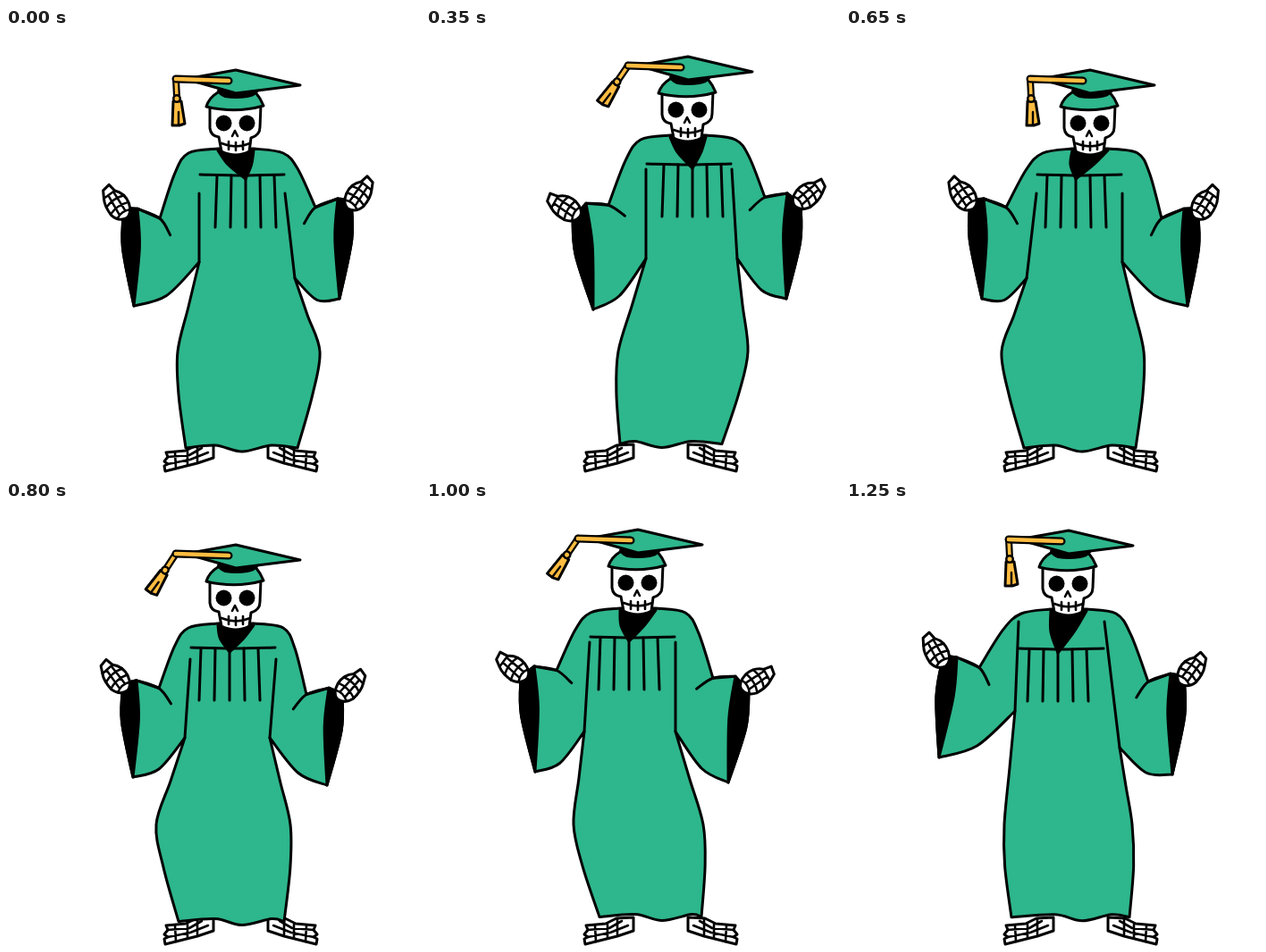
Animation, 463 px wide and 498 px high, one loop 1300 ms. Source, as an HTML page with a canvas:

```html
<!DOCTYPE html>
<html lang="en">
<head>
<meta charset="utf-8">
<title>Dancing graduate</title>
<style>
html, body { margin: 0; width: 100%; height: 100%; overflow: hidden; background: #fff; }
canvas { display: block; }
</style>
</head>
<body>
<canvas id="stage" width="463" height="498"></canvas>
<script>
const ctx = document.getElementById('stage').getContext('2d');
const GREEN = '#2eb68c', GOLD = '#ffbc40', INK = '#000', BONE = '#fff';
const LOOP = 1300, HALF = 650, STEP = 50, AXIS = 525;

// head: x, y, tassel angle. chest: x, y, drop of the sleeve seams.
// left and right: hand x y, sleeve tip x y, underarm x y, hip x, hand angle, hem x.
// The right side is stored mirrored, so both sides share one rig.
const poses = [
  { t: 0, head: [257, 64, 0], chest: [264, 164, 21],
    left: [124, 197, 143, 311, 216, 262, 192, 32, 201],
    right: [131, 187, 152, 303, 202, 280, 174, 35, 199] },
  { t: 150, head: [273, 66, 36], chest: [271, 164, 13],
    left: [141, 208, 166, 318, 230, 265, 207, 42, 214],
    right: [123, 198, 142, 309, 200, 265, 168, 38, 193] },
  { t: 350, head: [293, 49, 37], chest: [294, 152, 6],
    left: [156, 201, 187, 315, 246, 258, 215, 57, 217],
    right: [98, 187, 122, 303, 177, 258, 165, 50, 194] },
  { t: 550, head: [303, 39, 0], chest: [307, 149, 2],
    left: [161, 191, 183, 286, 239, 254, 215, 60, 206],
    right: [83, 174, 91, 271, 173, 222, 180, 48, 186] },
  { t: 600, head: [281, 50, 0], chest: [284, 165, -30],
    left: [139, 190, 160, 306, 219, 276, 205, 37, 208],
    right: [101, 169, 104, 287, 189, 235, 177, 30, 185] }
];

// The second half of the dance is the first one mirrored.
const flip = ({ t, head: [x, ...head], chest: [cx, ...chest], left, right }) => ({
  t: t + HALF, head: [530 - x, ...head], chest: [AXIS - cx, ...chest], left: right, right: left
});
const keys = [...poses, ...poses.map(flip)];
const keyAt = i => keys[(i + keys.length) % keys.length];
const gap = i => (keyAt(i + 1).t - keyAt(i).t + LOOP) % LOOP;

// Even entries use central slopes, odd entries follow a parabola through three keys.
function slope(part, i, k) {
  const [a, b, c] = [-1, 0, 1].map(d => keyAt(i + d)[part][k]);
  const h = gap(i - 1), g = gap(i);
  return k % 2 ? ((b - a) / h * g + (c - b) / g * h) / (h + g) : (c - a) / (h + g);
}
function poseAt(t) {
  const i = keys.filter(key => key.t <= t).length - 1;
  const h = gap(i), u = (t - keys[i].t) / h, v = 1 - u, s = u * u * (3 - 2 * u);
  const mix = part => keys[i][part].map((a, k) =>
    a + (keyAt(i + 1)[part][k] - a) * s +
    h * u * v * (v * slope(part, i, k) - u * slope(part, i + 1, k)));
  return { head: mix('head'), chest: mix('chest'), left: mix('left'), right: mix('right') };
}

const between = (p, q, u, dx = 0, dy = 0) =>
  [p[0] + (q[0] - p[0]) * u + dx, p[1] + (q[1] - p[1]) * u + dy];
const mirror = ([x, y]) => [AXIS - x, y];

// Builds one side of the gown around the hand, the head and the chest.
function side([hx, hy, tx, ty, ax, ay, hip, angle, hem], [headX, headY], [chestX, chestY, drop]) {
  const rad = angle * Math.PI / 180, tip = [tx, ty], arm = [ax, ay];
  const neck = [headX - 20, headY + 71], shoulder = [headX - 53, headY + 76];
  const elbow = [hx + 48, hy + 40 - 0.75 * angle];
  const crease = [elbow[0] + 22 * Math.sin(rad), elbow[1] + 22 * Math.cos(rad)];
  const cuff = [hx + 23, hy + 18 - 0.4 * angle];
  const rim = [cuff[0] - 15, cuff[1] + 0.7 * (angle - 33)];
  const hips = [hip, 362], foot = [hem, hemLine(headY) + 2];
  const opening = [rim, between(rim, tip, 0.4, -6), tip];
  return {
    outline: [
      [neck, shoulder, between(shoulder, elbow, 0.35, -4, -3), elbow],
      [cuff], opening,
      [tip, between(tip, arm, 0.5, 0, 13), arm],
      [arm, between(arm, hips, 0.5), hips, between(hips, foot, 0.45, -3), foot]
    ],
    cuff: [[cuff], opening, [tip, between(cuff, tip, 0.4, 4), cuff]],
    crease: [[cuff, elbow, crease]],
    seam: [[[chestX - 48, chestY + drop], arm]],
    hand: [[[hx, hy]]]
  };
}
function mirrored(parts) {
  const entries = Object.entries(parts).map(([name, lines]) => [name, lines.map(line => line.map(mirror))]);
  return Object.fromEntries(entries);
}
const hemLine = headY => 468 - 0.3 * (64 - headY);

// Adds a smooth line through the points to the current path.
function curve(pts) {
  ctx.lineTo(...pts[0]);
  for (let i = 0; i < pts.length - 1; i++) {
    const a = pts[i - 1] || pts[i], b = pts[i], c = pts[i + 1], d = pts[i + 2] || c;
    ctx.bezierCurveTo(b[0] + (c[0] - a[0]) / 6, b[1] + (c[1] - a[1]) / 6,
      c[0] - (d[0] - b[0]) / 6, c[1] - (d[1] - b[1]) / 6, c[0], c[1]);
  }
}
function shape(curves, fill) {
  ctx.beginPath();
  curves.forEach(curve);
  if (fill) { ctx.closePath(); ctx.fillStyle = fill; ctx.fill(); }
  ink(3);
}
function ink(width, color = INK) {
  ctx.lineWidth = width;
  ctx.strokeStyle = color;
  ctx.stroke();
}
function path(d, fill, width = 3) {
  const p = new Path2D(d);
  if (fill) { ctx.fillStyle = fill; ctx.fill(p); }
  ctx.lineWidth = width;
  ctx.strokeStyle = INK;
  ctx.stroke(p);
}
function dot(x, y, r, fill) {
  ctx.beginPath();
  ctx.arc(x, y, r, 0, 7);
  ctx.fillStyle = fill;
  ctx.fill();
}
function placed(x, y, angle, sx, draw) {
  ctx.save();
  ctx.translate(x, y);
  ctx.rotate(angle * Math.PI / 180);
  ctx.scale(sx, 1);
  draw();
  ctx.restore();
}

function foot() {
  path('M232 466V481L214 487L178 496L177 490L181 488L177 485L181 480L179 475L201 473L213 467Z', BONE);
  path('M181 480L205 478L219 470M181 488L206 483L226 475M189 475L190 493M203 474V489M214 468V485', null, 2.6);
}
function hand() {
  path('M-5 -21L4 -23L6 -14Q14 -6 12 6Q9 18 1 19Q-9 18 -12 7Q-13 -6 -9 -13Z', BONE);
  path('M-9 -13L6 -14M-12 -3Q0 -8 12 -4M-12 6Q0 1 12 5M-8 14Q0 9 9 13M-3 -13L-4 11M4 -14L4 11', null, 2.5);
}

function gown(left, right, head, chest, lean) {
  const [x, y] = chest, hem = hemLine(head[1]);
  const back = right.outline.slice().reverse().map(line => line.slice().reverse());
  const start = left.outline[4][4], end = back[0][0];
  shape([...left.outline, [start, [234, hem - 1], [264, hem + 6], [297, hem - 1], end], ...back], GREEN);
  for (const part of [left, right]) {
    shape(part.cuff, INK);
    shape(part.crease);
    shape(part.seam);
  }
  const tip = [x + lean, y + 5], throat = d => [head[0] + d, head[1] + 73];
  shape([[throat(-20), between(throat(-20), tip, 0.5, -4), tip],
    [tip, between(throat(20), tip, 0.5, 2), throat(20)]], INK);
  shape([[[x - 47, y], [x, y + 1], [x + 47, y]]]);
  for (let i = -2; i <= 2; i++) {
    const sx = x + lean + i * 16;
    shape([[[sx, y + 1], [sx + i, y + 59]]]);
  }
}

function tassel() {
  path('M-3 25L6 25L10 50L4 52L-4 52Z', GOLD);
  path('M3 37V51', null, 2.4);
  ctx.beginPath();
  ctx.moveTo(0, 0);
  ctx.lineTo(1, 20);
  ink(8);
  ink(3.6, GOLD);
  dot(1, 22, 5, INK);
  dot(1, 22, 2.5, GOLD);
}
function head(tilt) {
  path('M228 86V112Q229 121 238 122L241 138Q257 146 272 138L274 123Q284 120 284 111L285 86Z', BONE);
  dot(243.5, 106.5, 9, INK);
  dot(269.5, 106.5, 9, INK);
  path('M253 121L256 115L259 121', null, 2.6);
  path('M241 129Q257 136 273 129M249 127V136M257 128V137M265 127V136', null, 2.6);
  path('M224 88Q227 78 237 72H279Q285 79 288 87Q257 96 224 88Z', GREEN);
  path('M237 70H282Q278 76 270 77Q257 79 245 77Q239 75 237 70Z', INK, 2);
  path('M201 57L257 47L329 64L257 73Z', GREEN);
  placed(190, 57, tilt, 1, tassel);
  ctx.beginPath();
  ctx.moveTo(190, 57);
  ctx.lineTo(249, 59);
  ink(9);
  ink(4.6, GOLD);
  dot(190, 57, 2, GOLD);
}

function draw(t) {
  const pose = poseAt(t), [x, y, tilt] = pose.head, [chestX, ...chest] = pose.chest;
  const left = side(pose.left, pose.head, pose.chest);
  const right = mirrored(side(pose.right, [AXIS - x, y], [AXIS - chestX, ...chest]));
  ctx.fillStyle = '#fff';
  ctx.fillRect(0, 0, 463, 498);
  ctx.lineJoin = ctx.lineCap = 'round';
  foot();
  placed(AXIS, 0, 0, -1, foot);
  gown(left, right, pose.head, pose.chest, t < HALF ? 4 : -4);
  placed(...left.hand[0][0], -pose.left[7], 1, hand);
  placed(...right.hand[0][0], pose.right[7], -1, hand);
  placed(x - 257, y - 64, 0, 1, () => head(tilt));
}

const start = performance.now();
function tick() {
  const t = Math.max(0, performance.now() - start) % LOOP;
  draw(Math.floor(t / STEP) * STEP);
  requestAnimationFrame(tick);
}
tick();
</script>
</body>
</html>
```
